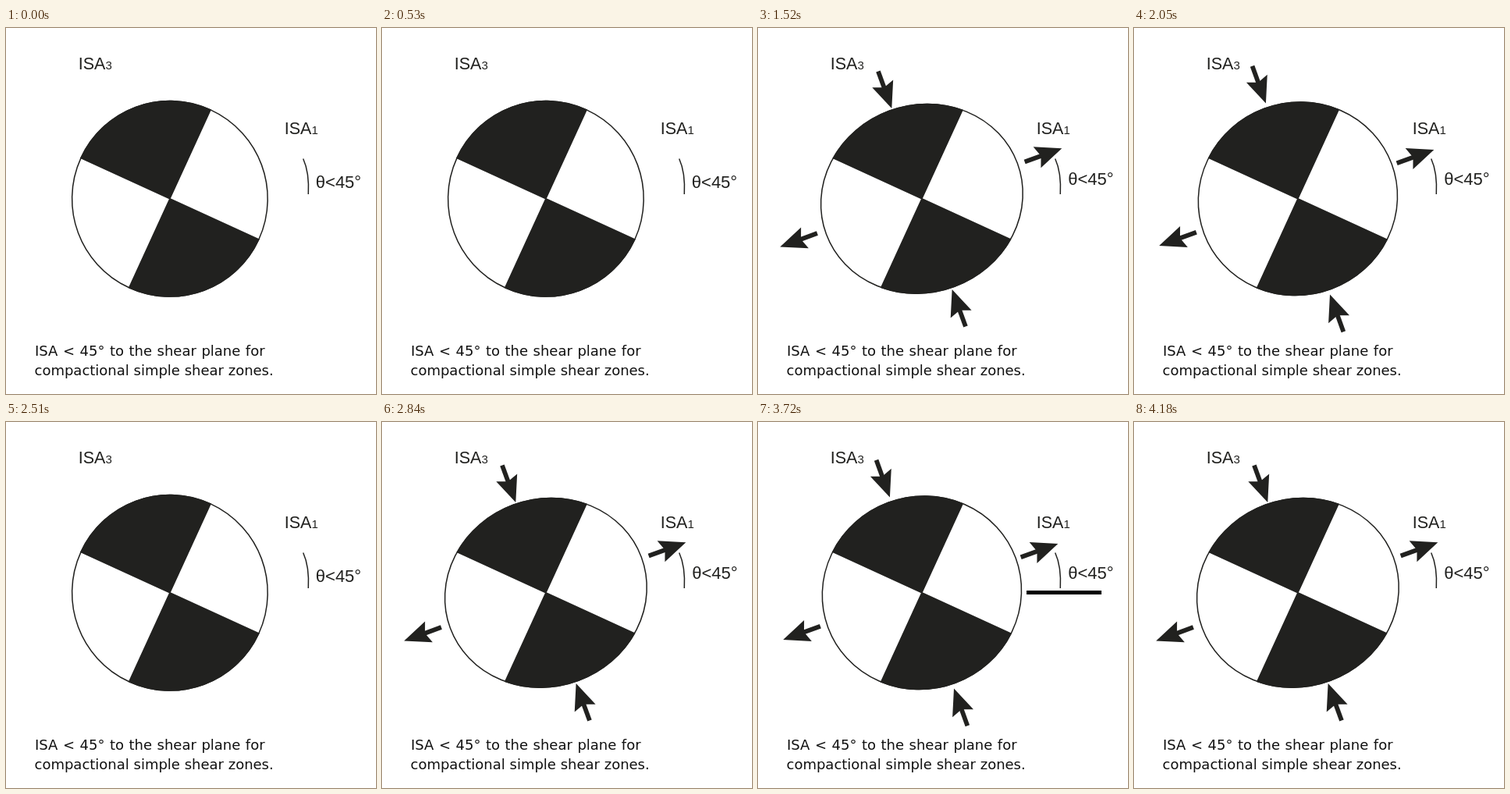
These frames come from a looping animation (474x469 px, 4.38 s). An HTML page with a canvas:

```html
<!DOCTYPE html>
<html lang="en">
<head>
<meta charset="utf-8">
<title>Shear zone ISA</title>
<style>
  html, body { margin: 0; width: 100%; height: 100%; overflow: hidden; background: #fff; }
  canvas { display: block; }
</style>
</head>
<body>
<canvas id="stage" width="474" height="469"></canvas>
<script>
const ctx = document.getElementById('stage').getContext('2d');
const LOOP = 4380;
const INK = '#21211f';
const TILT = -20.4 * Math.PI / 180;
const SANS = '"Liberation Sans", Arial, sans-serif';
const CAPTION = '18px "DejaVu Sans", Verdana, sans-serif';

// Start of each step; the steps cycle through the four poses.
const starts = [
  0, 70, 200, 400, 530, 730, 860, 1060, 1190, 1390, 1520, 1720, 1850, 2050,
  2200, 2380, 2510, 2710, 2840, 3080, 3170, 3380, 3500, 3720, 3850, 4050, 4180
];
const round = { a: 125.3, b: 125.3, thetaX: 396.8, thetaY: 204.5 };
const strained = { a: 128.2, b: 123.2, thetaX: 397.2, thetaY: 200.5, arrows: true, push: 0 };
const flattened = { ...strained, a: 130.6, b: 120, push: 1 };
const poses = [round, strained, flattened, { ...strained, plane: true }];

// Tip position, heading in degrees and travel along the heading.
const arrows = [
  { x: 168.9, y: 96.5, heading: 70, travel: 7 },
  { x: 384.3, y: 156, heading: -20, travel: 5.3 },
  { x: 251, y: 341.5, heading: 250, travel: 7 },
  { x: 32.2, y: 279, heading: 160, travel: 4.2 }
];

function text(str, x, y, font, color = INK) {
  ctx.font = font;
  ctx.fillStyle = color;
  ctx.fillText(str, x, y);
}

function axisLabel(index, x, y) {
  text('ISA', x, y, '21.5px ' + SANS);
  text(index, x + 34.8, y, '15px ' + SANS);
}

function strainEllipse({ a, b }) {
  const t = Math.atan2(a, b);
  ctx.save();
  ctx.translate(209.9, 218.8);
  ctx.fillStyle = ctx.strokeStyle = INK;
  ctx.lineWidth = 1.5;
  for (const from of [t, t - Math.PI]) {
    ctx.beginPath();
    ctx.moveTo(0, 0);
    ctx.ellipse(0, 0, a, b, TILT, from, from + Math.PI - 2 * t);
    ctx.closePath();
    ctx.fill();
    ctx.stroke();
  }
  ctx.beginPath();
  ctx.ellipse(0, 0, a, b, TILT, 0, 2 * Math.PI);
  ctx.stroke();
  ctx.restore();
}

function arrow({ x, y, heading, travel }, push) {
  ctx.save();
  ctx.translate(x, y);
  ctx.rotate(heading * Math.PI / 180);
  ctx.translate(travel * push, 0);
  ctx.fillStyle = INK;
  ctx.fillRect(-50.7, -2.9, 28, 5.8);
  ctx.beginPath();
  ctx.moveTo(0, 0);
  ctx.lineTo(-33.8, -14.3);
  ctx.lineTo(-28.5, 0);
  ctx.lineTo(-33.8, 14.3);
  ctx.fill();
  ctx.restore();
}

function angleArc() {
  ctx.strokeStyle = INK;
  ctx.lineWidth = 1.5;
  ctx.beginPath();
  ctx.moveTo(380.7, 167.5);
  ctx.quadraticCurveTo(388.7, 185, 387.3, 213);
  ctx.stroke();
}

function draw(pose) {
  ctx.fillStyle = '#fff';
  ctx.fillRect(0, 0, 474, 469);
  axisLabel('3', 92.8, 53);
  axisLabel('1', 356.8, 136);
  strainEllipse(pose);
  angleArc();
  text('θ<45°', pose.thetaX, pose.thetaY, '22px ' + SANS);
  if (pose.arrows) arrows.forEach(item => arrow(item, pose.push));
  if (pose.plane) {
    ctx.fillStyle = '#000';
    ctx.fillRect(344, 216, 96, 5);
  }
  ctx.wordSpacing = '0.8px';
  text('ISA < 45° to the shear plane for', 37, 420, CAPTION, '#111');
  ctx.wordSpacing = '0px';
  text('compactional simple shear zones.', 36.5, 445, CAPTION, '#111');
}

function tick() {
  const time = performance.now() % LOOP;
  const step = starts.findLastIndex(start => start <= time);
  draw(poses[step % poses.length]);
  requestAnimationFrame(tick);
}
tick();
</script>
</body>
</html>
```
